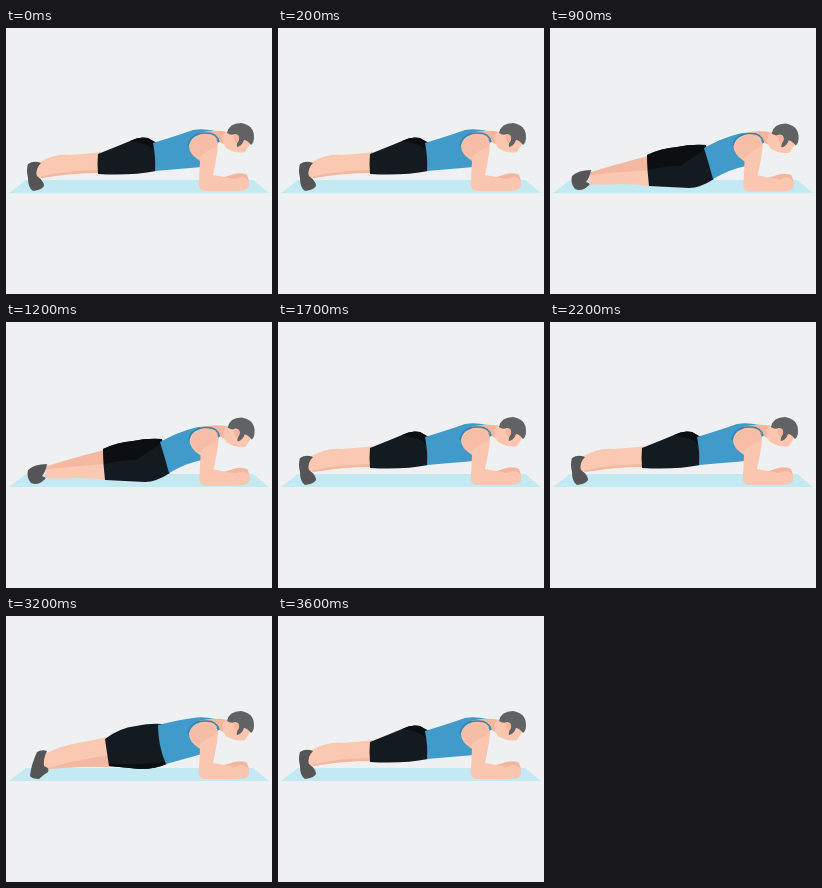
Write an HTML page that moves like this. It is 266 px wide and 266 px high and loops after 3700 ms.

```html
<!DOCTYPE html>
<html lang="en">
<head>
<meta charset="utf-8">
<title>Plank hip twist</title>
<style>
  html, body { margin: 0; width: 100%; height: 100%; overflow: hidden; background: #eff0f2; }
  svg { display: block; width: 100%; height: 100%; }
</style>
</head>
<body>
<svg viewBox="0 0 266 266">
  <path fill="#c3e9f2" d="M20 152H247L263 165H3Z"/>
  <path id="leg" fill="#fbc8b2"/>
  <path id="legShade" fill="#f4b8a1"/>
  <path id="shoe" fill="#555558"/>
  <path id="shorts" fill="#141b20"/>
  <path id="shortsShade" fill="#0b0f12"/>
  <path id="shirt" fill="#409aca"/>
  <g id="upper">
    <path fill="#f3b59b" d="M193 105Q206 101 222 104L225 119L215 115Q207 107 193 107Z"/>
    <path fill="#fbc6b0" d="M218 105Q214 113 220 120Q230 126 239 124L243 118L246 111L232 100Z"/>
    <path fill="#616264" d="M221 105Q223 95 235 95Q248 97 248 109Q248 115 245 117Q241 112 238 112Q236 118 231 119Q230 116 233 112Q234 106 229 106Q225 108 221 105Z"/>
    <path fill="#f3b59b" d="M227 108Q232 105 233 110Q232 115 229 114Z"/>
    <path fill="none" stroke="#3583b0" stroke-width="1.5" d="M182 118Q184 106 198 105Q211 104 213 114"/>
    <path fill="#f3b59b" d="M214 151Q235 142 241 147L243 153L226 157Z"/>
    <path fill="#fbc6b0" d="M183 118Q185 107 198 106Q212 107 212 118Q211 129 207 147L229 151Q236 147 241 151Q245 155 242 160Q239 163 232 163L198 163Q191 161 193 152L194 133Q183 126 183 118Z"/>
    <path fill="#f6bda6" d="M184 118Q186 108 198 107Q211 108 211 118Q199 123 193 130Q184 125 184 118Z"/>
  </g>
</svg>
<script>
const LOOP = 3700, STEP = 100;

const level = {
  leg: 'M30 136C44 128 54 126 64 127Q80 126 95 124L95 145Q75 142 60 146Q45 150 31 149Z',
  legShade: 'M33 149Q60 142 94 142L94 145Q65 145 36 150Z',
  shoe: 'M22 136Q28 132 35 135Q29 141 31 148Q38 153 38 158Q36 162 27 163Q22 160 22 150Q20 142 22 136Z',
  shorts: 'M92 126Q112 118 124 113Q133 108 142 110L151 115L150 143Q125 148 92 146Q91 136 92 126Z',
  shortsShade: 'M124 113Q133 108 142 110L150 115V123Q140 115 124 113Z',
  shirt: 'M147 115Q170 108 187 102Q197 100 209 103L214 112L196 139Q172 141 149 143Q150 130 147 115Z'
};

const dipped = {
  leg: 'M40 144C55 140 65 136 75 135Q88 132 100 128L102 158Q85 156 70 156Q55 157 39 156Z',
  legShade: 'M40 145Q70 135 98 128L100 142Q70 144 40 147Z',
  shoe: 'M22 148Q28 142 41 142Q40 149 36 154Q42 156 38 158Q32 164 25 161Q20 155 22 148Z',
  shorts: 'M97 127Q112 120 127 119Q141 116 156 117L164 151Q150 160 139 160L99 158Q97 142 97 127Z',
  shortsShade: 'M97 127Q112 120 127 119Q141 116 156 117V121L130 138Q115 138 98 142Z',
  shirt: 'M154 120Q172 110 188 106Q198 103 210 107L214 114L196 138Q180 141 163 151Q159 136 154 120Z'
};

const turned = {
  leg: 'M37 139C52 131 62 129 72 127Q88 124 102 121L106 151Q90 149 72 151Q58 153 36 152Z',
  legShade: 'M42 152Q65 145 104 139L106 151Q75 150 42 153Z',
  shoe: 'M31 136Q36 133 41 135Q37 143 38 150Q44 152 42 156Q37 159 33 163Q26 163 24 160Q25 149 31 136Z',
  shorts: 'M99 123Q113 112 130 110Q144 107 156 108L161 148Q150 153 134 153L103 150Q101 137 99 123Z',
  shortsShade: 'M103 147Q125 150 158 146L160 148Q150 153 134 153L103 150Z',
  shirt: 'M152 109Q172 104 187 102Q197 100 209 103L214 112L196 138Q178 143 160 148Q152 130 152 109Z'
};

const sequence = [level, dipped, level, turned];
const hold = LOOP / sequence.length;
const byId = id => document.getElementById(id);
let shown;

function draw(time) {
  const t = Math.floor((time % LOOP) / STEP) * STEP;
  // The loop begins halfway through the level pose.
  const pose = sequence[Math.floor((t + hold / 2) / hold) % sequence.length];
  if (pose === shown) return;
  shown = pose;
  for (const id in pose) byId(id).setAttribute('d', pose[id]);
  byId('upper').setAttribute('transform', `translate(${pose === dipped ? '0.6 0.6' : '0 0'})`);
}

const start = performance.now();
function tick() {
  draw(performance.now() - start);
  requestAnimationFrame(tick);
}
tick();
</script>
</body>
</html>
```
